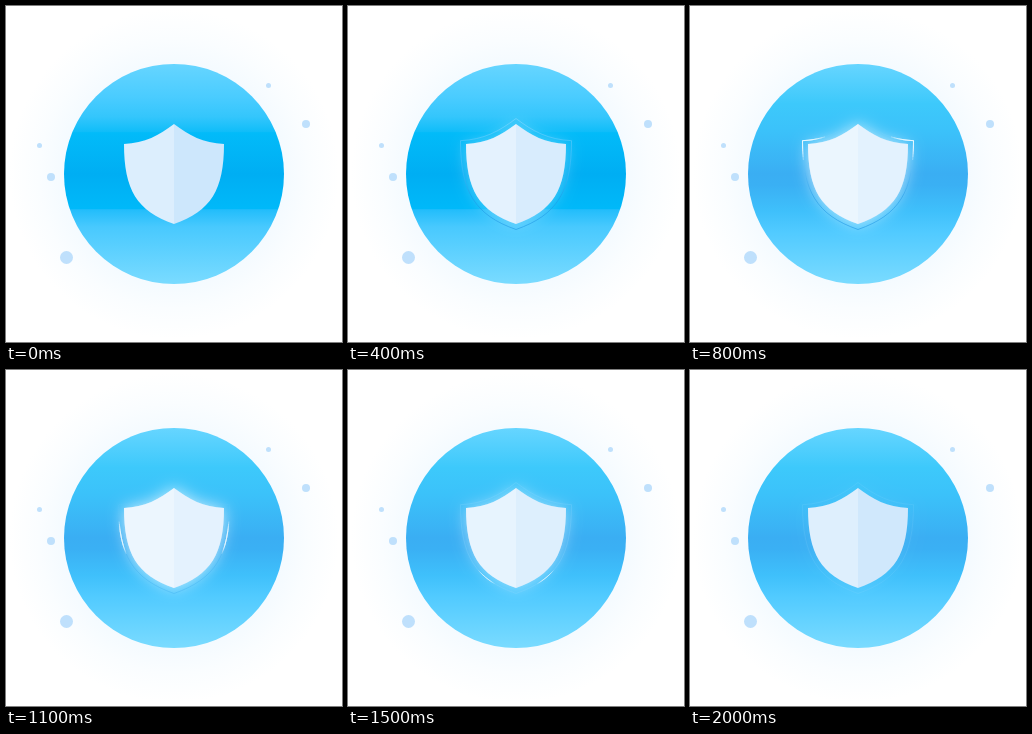
An HTML page with a canvas that plays this animation: 336x336 px, repeating every 2200 ms.

```html
<!DOCTYPE html>
<html lang="en">
<head>
<meta charset="utf-8">
<title>Shield</title>
<style>
html, body { margin: 0; width: 100%; height: 100%; overflow: hidden; background: #fff; }
canvas { display: block; width: 336px; height: 336px; }
</style>
</head>
<body>
<canvas id="stage" width="336" height="336"></canvas>
<script>
const ctx = document.getElementById('stage').getContext('2d');
const C = 168, LOOP = 2200, STEP = 100, LAST = 20;

const dots = [[262.5, 79.5, 2.5], [300, 118, 4], [33.5, 139.5, 2.5], [45, 171, 4], [60.5, 251.5, 6.5]];

const deepStops = [
  [0, '#66d5ff'], [.15, '#4accff'], [.24, '#34c6fc'], [.309, '#0fbdf9'], [.312, '#02bbf9'],
  [.5, '#00aef3'], [.659, '#00b9f9'], [.662, '#22bdfb'], [.74, '#48c9fe'], [1, '#7adbff']
];
const softStops = [
  [0, '#66d5ff'], [.18, '#3dc9fb'], [.3, '#3bc2fa'], [.5, '#3aaef3'],
  [.55, '#3ab0f4'], [.67, '#3fc0fb'], [.76, '#50caff'], [1, '#7adbff']
];

// Half outline from the tip to the bottom, centred on 0,0
function half(side, k) {
  const p = new Path2D(), s = side * k;
  p.moveTo(0, -50 * k);
  p.bezierCurveTo(15 * s, -38.5 * k, 29 * s, -31 * k, 50 * s, -30 * k);
  p.bezierCurveTo(50 * s, 16 * k, 37 * s, 37 * k, 0, 50 * k);
  return p;
}
const body = [half(-1, 1), half(1, 1)];
const ring = [half(-1, 1.11), half(1, 1.11)];
const tints = ['#dceefd', '#cde7fc'];
const whole = new Path2D();
body.forEach(p => whole.addPath(p));

const clamp = x => Math.max(0, Math.min(1, x));
const ramp = (t, a, b) => clamp((t - a) / (b - a));

function gradient(g, stops) {
  stops.forEach(([at, color]) => g.addColorStop(at, color));
  return g;
}

function disc(x, y, r, fill) {
  ctx.fillStyle = fill;
  ctx.beginPath();
  ctx.arc(x, y, r, 0, Math.PI * 2);
  ctx.fill();
}

function backdrop(t) {
  ctx.fillStyle = '#fff';
  ctx.fillRect(0, 0, 336, 336);
  const halo = ctx.createRadialGradient(C, C, 105, C, C, 165);
  disc(C, C, 165, gradient(halo, [[0, '#f3faff'], [.5, '#fafdff'], [1, '#ffffff']]));
  dots.forEach(([x, y, r]) => disc(x, y, r, '#bfe0fc'));
  const fill = ctx.createLinearGradient(0, 58, 0, 278);
  disc(C, C, 110, gradient(fill, t < 500 ? deepStops : softStops));
}

function glow(a) {
  if (a <= 0) return;
  ctx.save();
  ctx.shadowColor = `rgba(255,255,255,${.75 * a})`;
  ctx.shadowBlur = 16;
  ctx.shadowOffsetX = 1000;
  ctx.translate(-1000, 0);
  ctx.fillStyle = '#fff';
  ctx.fill(whole);
  ctx.restore();
}

function shield(lit) {
  body.forEach((p, i) => {
    ctx.fillStyle = tints[i];
    ctx.fill(p);
    ctx.fillStyle = `rgba(255,255,255,${.45 * lit})`;
    ctx.fill(p);
  });
}

function strokeRing(color) {
  ctx.strokeStyle = color;
  ring.forEach(p => ctx.stroke(p));
}

function baseRing(t) {
  const dark = ramp(t, 100, 400) * (1 - ramp(t, 800, 1300));
  const edge = ctx.createLinearGradient(0, -56, 0, 56);
  gradient(edge, [
    [0, `rgba(150,220,255,${.5 * dark * (1 - ramp(t, 400, 700))})`],
    [.45, `rgba(90,190,250,${.4 * dark})`],
    [.7, `rgba(30,150,228,${.5 * dark})`],
    [1, `rgba(30,150,228,${.6 * dark})`]
  ]);
  strokeRing(edge);
  const pale = ramp(t, 1300, 1700) * (1 - .7 * ramp(t, 1700, 2000));
  strokeRing(`rgba(160,220,255,${.4 * pale})`);
}

function sparks(t) {
  const a = ramp(t, 500, 750) * (1 - .75 * ramp(t, 1300, 1700)) * (1 - ramp(t, 1700, 1900));
  if (a <= 0) return;
  const tail = 38 + .132 * (t - 800), head = 80 + .102 * (t - 800);
  ctx.save();
  // Nested dashes give soft ends
  for (let i = 0; i < 5; i++) {
    const trim = (head - tail) * i * .07;
    const from = Math.max(0, tail + trim), len = head - trim - from;
    if (len <= 0) continue;
    ctx.setLineDash([len, 999]);
    ctx.lineDashOffset = -from;
    strokeRing(`rgba(255,255,255,${.32 * a})`);
  }
  ctx.restore();
}

function draw(t) {
  const lit = ramp(t, 0, 850) * (1 - ramp(t, 1250, 2100));
  backdrop(t);
  ctx.save();
  ctx.translate(C, C);
  ctx.lineWidth = 1;
  glow(lit);
  baseRing(t);
  sparks(t);
  shield(lit);
  ctx.restore();
}

const start = performance.now();
function frame() {
  const t = (performance.now() - start) % LOOP;
  draw(Math.min(LAST, Math.floor(t / STEP)) * STEP);
  requestAnimationFrame(frame);
}
frame();
</script>
</body>
</html>
```
